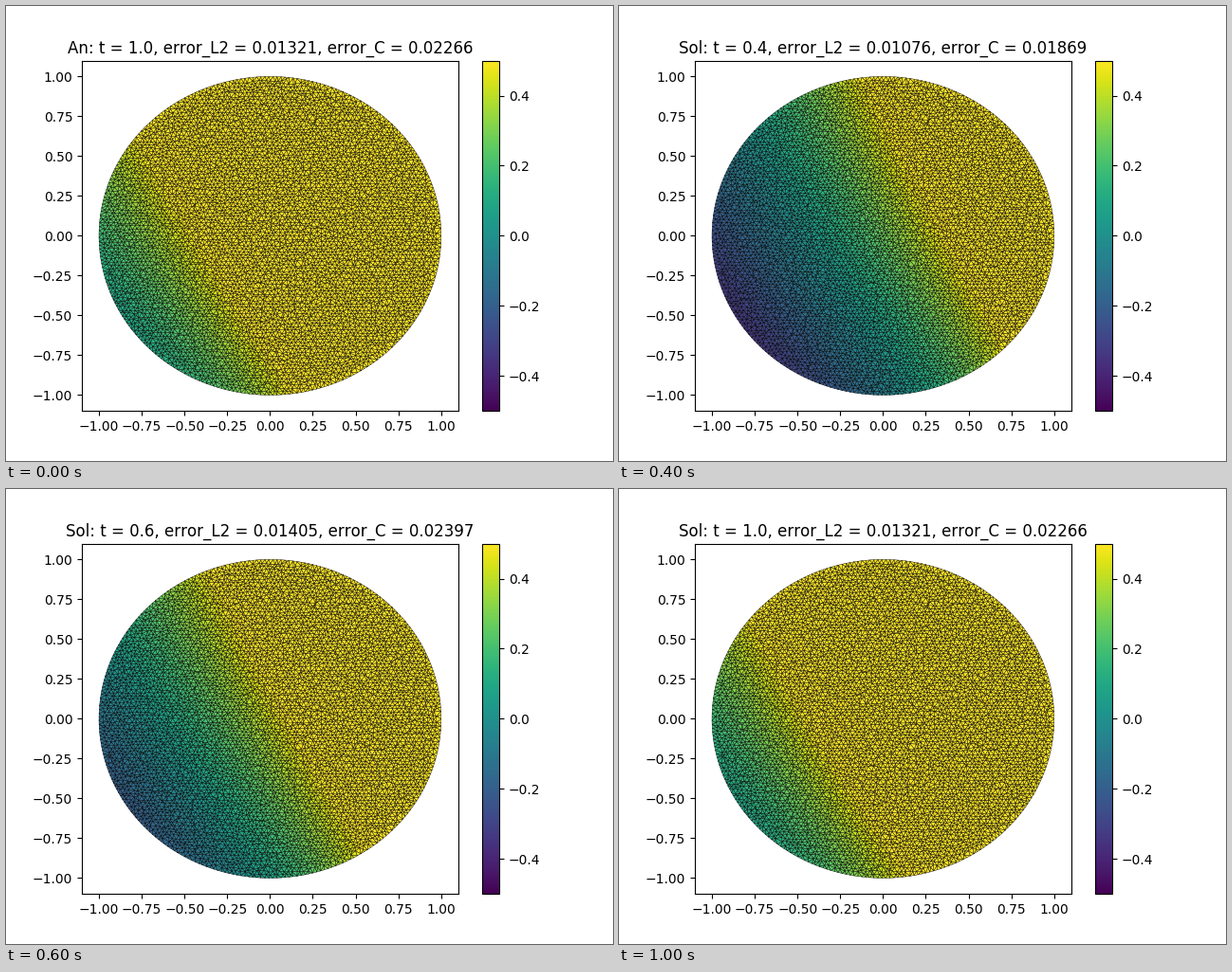
Write a matplotlib script that moves like this. It is 640 px wide and 480 px high and loops after 1200 ms.

```python
import matplotlib.pyplot as plt
import numpy as np
from matplotlib.animation import FuncAnimation
from matplotlib.tri import Triangulation

plt.rcParams["text.kerning_factor"] = 6

CELL = 0.0235
STEPS = 5
ERRORS = [(0.01805, 0.03105), (0.01076, 0.01869), (0.01405, 0.02397),
          (0.01237, 0.02137), (0.01321, 0.02266)]


def disc_mesh(cell):
    """Irregular Delaunay mesh of the unit disc."""
    rng = np.random.default_rng(4)
    n = int(2.2 / cell)
    row, col = np.mgrid[-n:n + 1, -n:n + 1]
    x = cell * (col + 0.5 * (row % 2)).ravel()
    y = cell * np.sqrt(0.75) * row.ravel()
    inside = np.hypot(x, y) < 1 - 0.65 * cell
    jitter = rng.uniform(-0.3, 0.3, (2, inside.sum())) * cell
    points = np.array([x[inside], y[inside]]) + jitter
    points = points[:, np.hypot(*points) < 1 - 0.45 * cell]
    angle = np.linspace(0, 2 * np.pi, round(2 * np.pi / cell), endpoint=False)
    rim = np.array([np.cos(angle), np.sin(angle)])
    return Triangulation(*np.hstack([points, rim]))


def field(x, y, t):
    """Front moving towards the lower left, slightly curved."""
    w = -0.005 + 0.57 * x + 0.3 * y + 0.75 * t
    return w + 0.13 * (w**2 - 0.25) + 0.035 * (x**2 - y**2)


mesh = disc_mesh(CELL)
center_x = mesh.x[mesh.triangles].mean(axis=1)
center_y = mesh.y[mesh.triangles].mean(axis=1)

fig, ax = plt.subplots(figsize=(6.4, 4.8), dpi=100)
surface = ax.tripcolor(mesh, facecolors=field(center_x, center_y, 1.0),
                       cmap="viridis", vmin=-0.5, vmax=0.5,
                       edgecolors="k", linewidth=0.3)
ax.set(xlim=(-1.1, 1.1), ylim=(-1.1, 1.1))
fig.colorbar(surface, ax=ax)
title = ax.set_title("")


def update(frame):
    step = frame or STEPS
    t = step / STEPS
    label = "Sol" if frame else "An"
    error_l2, error_c = ERRORS[step - 1]
    surface.set_array(field(center_x, center_y, t))
    title.set_text(f"{label}: t = {t:.1f}, error_L2 = {error_l2:.5f}, "
                   f"error_C = {error_c:.5f}")
    return surface, title


anim = FuncAnimation(fig, update, frames=STEPS + 1, interval=200,
                     repeat=True, repeat_delay=0)
plt.show()
```
